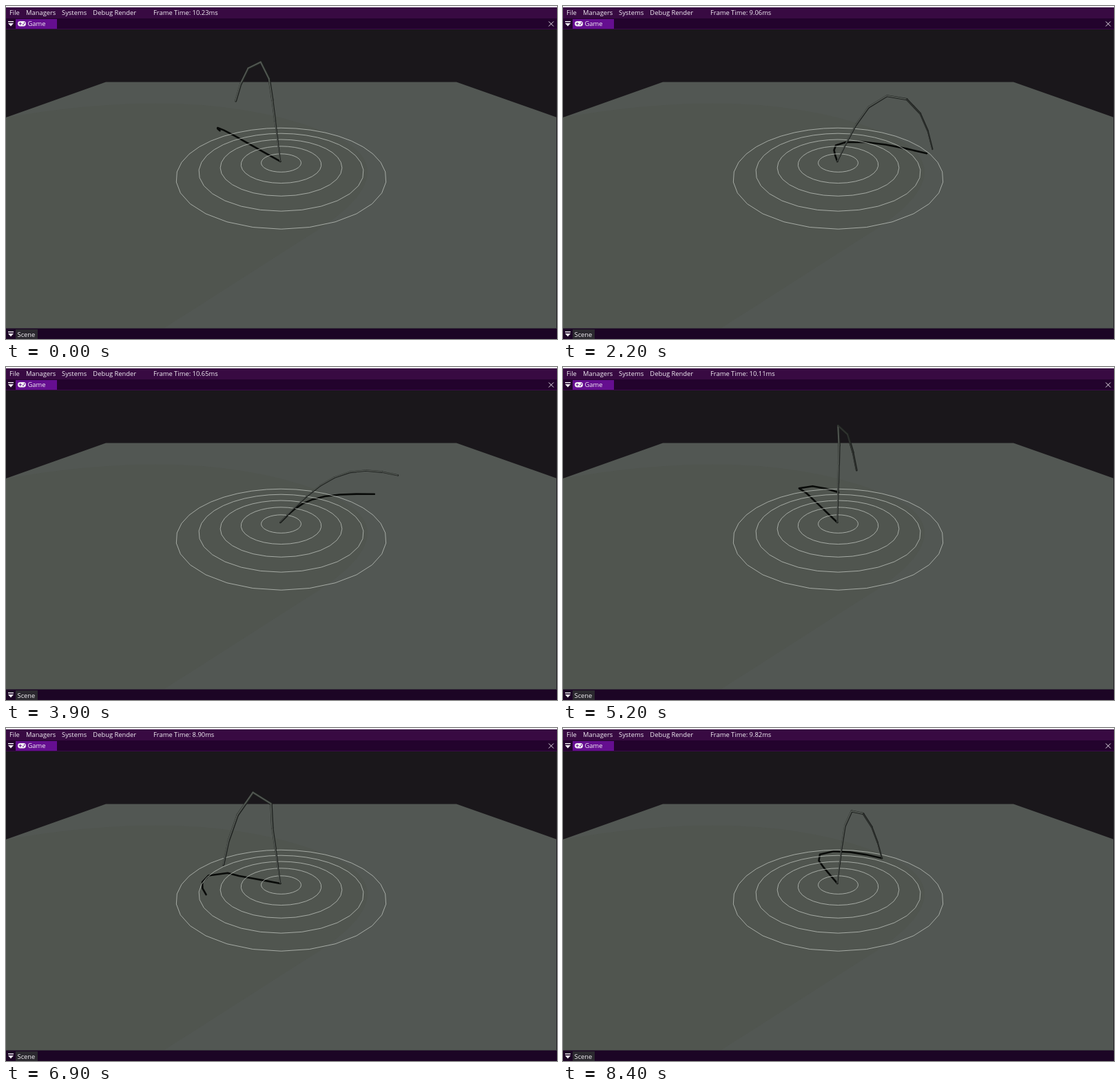
These frames come from a looping animation (800 by 484 pixels, 8500 ms). An HTML page:

```html
<!DOCTYPE html>
<html lang="en">
<head>
<meta charset="utf-8">
<title>Robot arm viewport</title>
<style>
  html, body { margin: 0; width: 100%; height: 100%; overflow: hidden; background: #1a171b; }
  svg { display: block; }
  text { font: 9.4px "Open Sans", "Noto Sans", sans-serif; fill: #f2eef4; }
  .line { fill: none; stroke-linejoin: round; stroke-linecap: round; }
</style>
</head>
<body>
<svg width="800" height="484" viewBox="0 0 800 484">
  <defs>
    <g id="collapse" fill="#f2eef4">
      <rect x="3" y="-4" width="8" height="1.4"/>
      <path d="M3-1H11L7 3.5Z"/>
    </g>
  </defs>

  <rect width="800" height="484" fill="#1a171b"/>
  <path d="M0 162L145 110.5H654L800 162V468H0Z" fill="#525753"/>
  <path d="M0 162Q300 110 480 190Q590 245 430 340L230 468H0Z" fill="#50554f"/>
  <path id="shadow" class="line" stroke="#090b09" stroke-width="2.6"/>
  <path id="rings" class="line" stroke="#bcc0ba" stroke-width=".8"/>
  <g id="outline" class="line" stroke="#1d201e"></g>
  <g id="faces" class="line" transform="translate(-.5 -.3)"></g>

  <rect width="800" height="2" fill="#eeeaf0"/>
  <rect y="2" width="800" height="16" fill="#380a42"/>
  <rect y="18" width="800" height="16" fill="#23032d"/>
  <rect x="14" y="19" width="60" height="14" fill="#650e90"/>
  <rect y="33" width="800" height="1" fill="#3a0a48"/>
  <rect y="468" width="800" height="16" fill="#1c0525"/>
  <rect y="468" width="800" height="1" fill="#35303a"/>
  <rect x="14" y="470" width="32" height="14" fill="#2b292f"/>
  <rect x="799" y="34" width="1" height="434" fill="#242126"/>

  <text x="5" y="13.3">File</text>
  <text x="29" y="13.3">Managers</text>
  <text x="81" y="13.3">Systems</text>
  <text x="126.3" y="13.3">Debug Render</text>
  <text id="timing" x="214" y="13.3"></text>
  <text x="31.5" y="29.3">Game</text>
  <text x="16.5" y="480.5">Scene</text>
  <use href="#collapse" y="26"/>
  <use href="#collapse" y="477"/>
  <path d="M788 22.5L795 29.5M795 22.5L788 29.5" stroke="#e6e0e8"/>
  <rect x="17" y="22" width="12" height="7.5" rx="3.7" fill="#f2eef4"/>
  <path d="M18.8 25.7H22.8M20.8 23.7V27.7" stroke="#650e90"/>
  <circle cx="25" cy="26.8" r=".9" fill="#650e90"/>
  <circle cx="26.7" cy="24.7" r=".9" fill="#650e90"/>
</svg>
<script>
const LOOP = 8500, STEP = 100;
const SIN = 0.509, COS = 0.861, FOCAL = 389, HEIGHT = 6.14, BACK = 12, CX = 399.5, CY = 251;
const SHADOW_X = -0.63, SHADOW_Z = 0.5;   // shadow offset per unit of height
const FOOT = [-0.04, 0, 0.1], SEGMENTS = 8, LENGTH = 1.02;

const linear = u => u;
const accelerate = u => u ** 1.7;
const swing = k => u => Math.sin(k * u) / Math.sin(k);

// The tip's target and the sideways lean (x, z per unit of height) of the resting arm.
const poses = [
  { at: 0, ms: 10.23, tip: [-2.59, 2.18, 3.41], lean: [-.14, .45], ease: linear },
  { at: 800, ms: 9.24, tip: [-1.44, 1.32, 1.9], lean: [-.09, .36], ease: accelerate },
  { at: 2200, ms: 9.06, tip: [4.95, .32, .89], lean: [.48, .28], ease: swing(2) },
  { at: 3900, ms: 10.65, tip: [6.85, 1.42, 3.35], lean: [1.1, 1.2], ease: linear },
  { at: 5200, ms: 10.11, tip: [1.08, 1.67, 3.53], lean: [.03, .75], ease: swing(2.1) },
  { at: 6900, ms: 8.9, tip: [-2.32, 1.9, -2], lean: [-.11, -.2], ease: swing(1.2) },
  { at: 8400, ms: 9.82, tip: [2.7, 0, 3.54], lean: [.145, .73] }
];

const $ = id => document.getElementById(id);
const mix = (a, b, u) => a + (b - a) * u;
const mixAll = (a, b, u) => a.map((v, i) => mix(v, b[i], u));
const polyline = points => "M" + points.map(p => p.map(v => v.toFixed(2)).join(" ")).join("L");

function project([x, y, z]) {
  const depth = (BACK + z) * COS + (HEIGHT - y) * SIN;
  const down = (HEIGHT - y) * COS - (BACK + z) * SIN;
  return [CX + FOCAL * x / depth, CY + FOCAL * down / depth];
}

// Point one segment length away from a, towards b.
function reach(a, b) {
  const distance = Math.hypot(...b.map((v, i) => v - a[i])) || 1;
  return mixAll(a, b, LENGTH / distance);
}

// Fix the first joint at an anchor and drag the others after it.
function drag(joints, anchor) {
  const result = [anchor];
  for (const joint of joints.slice(1)) result.push(reach(result.at(-1), joint));
  return result;
}

// FABRIK inverse kinematics, starting from a straight leaning arm.
function solveArm(tip, [leanX, leanZ]) {
  const scale = LENGTH / Math.hypot(leanX, 1, leanZ);
  const direction = [leanX * scale, scale, leanZ * scale];
  let joints = Array.from({ length: SEGMENTS + 1 }, (_, i) =>
    FOOT.map((v, axis) => v + i * direction[axis]));
  for (let pass = 0; pass < 12; pass++) {
    joints = drag(joints.reverse(), tip);
    joints = drag(joints.reverse(), FOOT);
  }
  return joints;
}

function ring(radius) {
  const points = Array.from({ length: 32 }, (_, i) => {
    const angle = i * Math.PI / 16;
    return project([radius * Math.sin(angle), 0, radius * Math.cos(angle)]);
  });
  return polyline(points) + "Z";
}
$("rings").setAttribute("d", [1, 2, 3, 4, 5].map(ring).join(""));

// Segments look thicker the higher they are; those falling to the right are in shade.
function drawArm(joints) {
  const screen = joints.map(project);
  let outline = "", faces = "";
  for (let i = 0; i < SEGMENTS; i++) {
    const a = screen[i], b = screen[i + 1];
    const width = 1.7 + .25 * (joints[i][1] + joints[i + 1][1]);
    const shaded = b[0] > a[0] && b[1] - a[1] > .3 * (b[0] - a[0]);
    const d = polyline([a, b]);
    outline += `<path d="${d}" stroke-width="${width}"/>`;
    faces += `<path d="${d}" stroke-width="${width * .55}" stroke="${shaded ? "#2f322f" : "#515651"}"/>`;
  }
  $("outline").innerHTML = outline;
  $("faces").innerHTML = faces;
}

function draw(time) {
  let i = 0;
  while (i < poses.length - 2 && time >= poses[i + 1].at) i++;
  const from = poses[i], to = poses[i + 1];
  const u = (time - from.at) / (to.at - from.at);
  const eased = from.ease(u);
  const joints = solveArm(mixAll(from.tip, to.tip, eased), mixAll(from.lean, to.lean, eased));
  const shadow = joints.map(([x, y, z]) => project([x + y * SHADOW_X, 0, z + y * SHADOW_Z]));

  drawArm(joints);
  $("shadow").setAttribute("d", polyline(shadow));
  $("timing").textContent = `Frame Time: ${mix(from.ms, to.ms, u).toFixed(2)}ms`;
}

const start = performance.now();
function tick() {
  const time = (performance.now() - start) % LOOP;
  draw(Math.floor(time / STEP) * STEP);
  requestAnimationFrame(tick);
}
tick();
</script>
</body>
</html>
```
